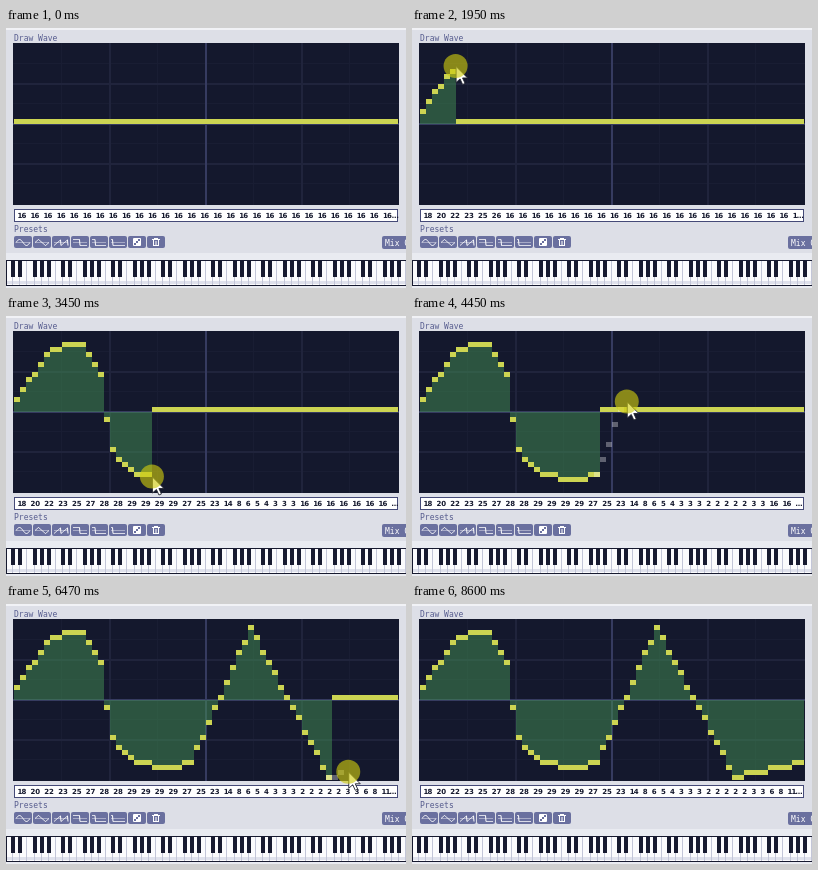
An HTML page with a canvas that plays this animation: 400x260 px, repeating every 8.99 s.

```html
<!DOCTYPE html>
<html lang="en">
<head>
<meta charset="utf-8">
<title>Wave editor</title>
<style>
html, body { margin: 0; width: 400px; height: 260px; overflow: hidden; }
canvas { display: block; }
</style>
</head>
<body>
<canvas id="stage" width="400" height="260"></canvas>
<script>
const ctx = document.getElementById("stage").getContext("2d");
const LOOP = 8990, LAG = 40;
const LEFT = 8, COL = 6, ROW = 5, MID = 96;
const INK = "#6a709f", NIGHT = "#14182d";
const DRAG_START = 1210, DRAG_END = 3920;

// Freehand curve: column, level
const curve = [[0, 18], [5, 27], [9, 29], [11, 29], [14, 23], [15, 14],
  [16, 8], [17, 6], [20, 3], [25, 1.8], [29, 2.9]];
// Freehand pace: time, column
const pace = [[DRAG_START, 0.3], [1950, 6], [2630, 15.5], [3040, 17.7], [DRAG_END, 29.2]];
// Pointer outside the freehand drag: time, x, y
const path = [[70, 309, 223], [740, 10, 93], [DRAG_START, 10, 93],
  [4170, 184, 157], [4960, 243, 23], [5333, 243, 23], [5810, 295, 140],
  [6270, 321, 172], [6300, 321, 172], [7150, 391, 160], [8080, 391, 160], [8620, 373, 265]];
// Straight lines: preview start, commit time, two ends as column and level
const lines = [
  { start: 4250, end: 5200, from: [29, 3], to: [39, 30] },
  { start: 5400, end: 6340, from: [39, 30], to: [52, 0] },
  { start: 6340, end: 7730, from: [52, 0], to: [63, 3] }
];

const clamp = (v, max) => Math.max(0, Math.min(max, v));
const easeOut = k => Math.sin(k * Math.PI / 2);
const column = x => clamp(Math.floor((x - LEFT) / COL), 63);
const level = y => clamp(Math.floor(16 + (MID - y) / ROW), 31);
const rowTop = v => MID - (v - 15) * ROW;

function interpolate(keys, at, ease = k => k) {
  const i = keys.findIndex(key => key[0] > at);
  if (i <= 0) return keys.at(i).slice(1);
  const a = keys[i - 1], b = keys[i];
  const k = ease((at - a[0]) / (b[0] - a[0]));
  return a.slice(1).map((v, n) => v + (b[n + 1] - v) * k);
}

const paceAt = t => interpolate(pace, t)[0];
const curveAt = c => interpolate(curve, c)[0];

function pointer(t) {
  if (t < DRAG_START || t > DRAG_END + 200) return interpolate(path, t, easeOut);
  const c = paceAt(t);
  return [LEFT + c * COL, rowTop(curveAt(c - 1)) + ROW / 2];
}

function linePoints([c0, v0], [c1, v1]) {
  const steps = Math.abs(c1 - c0), dir = Math.sign(c1 - c0);
  return Array.from({ length: steps + 1 }, (_, i) =>
    [c0 + i * dir, Math.ceil(v0 + (v1 - v0) * i / (steps || 1) - 0.5)]);
}

function waveAt(t) {
  const wave = Array(64).fill(16);
  if (t < DRAG_START) return wave;
  const c = paceAt(t - LAG), head = Math.floor(c);
  for (let i = 0; i <= head; i++) wave[i] = Math.round(curveAt(i));
  if (t < DRAG_END) wave[head] = Math.round(curveAt(c - 1));
  for (const { end, from, to } of lines) {
    if (t >= end) linePoints(from, to).forEach(([i, v]) => wave[i] = v);
  }
  return wave;
}

function rect(x, y, w, h, color) {
  ctx.fillStyle = color;
  ctx.fillRect(x, y, w, h);
}

function rounded(x, y, w, h, r, color) {
  ctx.fillStyle = color;
  ctx.beginPath();
  ctx.roundRect(x, y, w, h, r);
  ctx.fill();
}

function polyline(points, color) {
  ctx.strokeStyle = color;
  ctx.lineWidth = 1;
  ctx.beginPath();
  points.forEach(([x, y]) => ctx.lineTo(x, y));
  ctx.stroke();
}

function label(text, x, y, color, font = '8px "DejaVu Sans Mono", monospace') {
  ctx.font = font;
  ctx.fillStyle = color;
  ctx.fillText(text, x, y);
}

const bar = (c, v, color) => rect(LEFT + c * COL, rowTop(v), COL, ROW, color);

function drawGrid() {
  rect(7, 15, 386, 162, NIGHT);
  for (const i of [1, 3, 5, 7, 2, 6, 4]) {
    const size = i % 2 ? 1 : 2;
    const color = i === 4 ? "#363b60" : i % 2 ? "#191d33" : "#20243c";
    rect(LEFT + i * 48 - 1, 15, size, 162, color);
    rect(7, 15 + i * 20, 386, size, color);
  }
}

function drawWave(wave) {
  wave.forEach((v, c) => {
    const y = rowTop(v);
    if (v !== 16) rect(LEFT + c * COL, Math.min(y, MID), COL, Math.abs(MID - y), "rgba(66,140,84,.52)");
  });
  wave.forEach((v, c) => bar(c, v, "#ccd452"));
}

function drawPreview(t) {
  const line = lines.find(({ start, end }) => t >= start && t < end);
  if (!line) return;
  const [x, y] = pointer(t - LAG);
  linePoints(line.from, [column(x), level(y)])
    .forEach(([c, v]) => bar(c, v, "rgba(255,255,255,.32)"));
}

function drawValues(wave) {
  const font = 'bold 7px "DejaVu Sans", sans-serif';
  const advance = ch => ch === "1" ? 4 : ch === " " ? 4.3 : 4.75;
  rect(8, 181, 384, 13, "#454a78");
  rect(9, 182, 382, 11, "#fff");
  let x = 11.5;
  for (const ch of wave.join(" ")) {
    if (x + advance(ch) + 5 > 391.5) break;
    label(ch, x, 190, NIGHT, font);
    x += advance(ch);
  }
  label("…", x, 190, NIGHT, font);
}

const pulse = width => k => k < width ? 1 : -1;
const shapes = [
  k => Math.sin(k * 2 * Math.PI),
  k => Math.asin(Math.sin(k * 2 * Math.PI)) * 2 / Math.PI,
  k => (k * 2 % 1) * 2 - 1,
  pulse(0.5), pulse(0.25), pulse(0.125)
];

function drawPresets() {
  for (let i = 0; i < 8; i++) {
    const x = 8 + i * 19;
    rounded(x, 208, 18, 12, 2, INK);
    if (i < 6) {
      rect(x + 2, 214, 14, 1, "rgba(255,255,255,.4)");
      polyline(Array.from({ length: 29 }, (_, n) =>
        [x + 2 + n / 2, 214.5 - 3 * shapes[i](n / 28)]), "#fff");
    } else if (i === 6) {
      rounded(x + 5, 210, 8, 8, 1, "#fff");
      for (let n = 0; n < 3; n++) rect(x + 6 + n * 2, 215 - n * 2, 2, 2, INK);
    } else {
      rect(x + 5, 211, 8, 1, "#fff");
      rect(x + 7, 210, 4, 1, "#fff");
      ctx.strokeRect(x + 6.5, 211.5, 5, 6);
      rect(x + 8.5, 213, 1, 4, "#fff");
    }
  }
  rounded(376, 208, 40, 13, 2, INK);
  label("Mix C", 379, 217.5, "#fff");
}

function drawPiano() {
  const count = 56, key = 400 / count;
  rect(0, 232, 400, 26, "#171a30");
  rect(1, 233, 399, 24, "#fbfbfd");
  rect(1, 253, 399, 3, "#dfe1ec");
  for (let i = 1; i <= count; i++) {
    const x = Math.round(i * key);
    rect(x - 1, 233, 1, 24, "#c3c6d8");
    if (i % 7 !== 3 && i % 7 !== 0) rect(x - 2, 233, 4, 16, "#171a30");
  }
}

function drawPointer(t) {
  if (t < 70 || t >= 8600) return;
  const [x, y] = pointer(t);
  const arrow = [[0, 0], [0, 16], [4, 12.5], [6.5, 18], [9, 17], [6.5, 11.5], [11.5, 11.5]];
  ctx.beginPath();
  arrow.forEach(([px, py]) => ctx.lineTo(x + px, y + py));
  ctx.closePath();
  ctx.fillStyle = "#fff";
  ctx.strokeStyle = "#20222e";
  ctx.lineWidth = 0.9;
  ctx.fill();
  ctx.stroke();
  const released = t < 940 || t >= 7780 || (t >= 5200 && t < 5390);
  if (released) return;
  ctx.fillStyle = `rgba(206,203,14,${t < 1010 ? 0.35 : 0.63})`;
  ctx.beginPath();
  ctx.arc(x - 0.5, y - 0.5, 12, 0, 2 * Math.PI);
  ctx.fill();
}

function draw(t) {
  const wave = waveAt(t);
  rect(0, 0, 400, 260, "#dddfe7");
  rect(0, 0, 400, 2, "#f1f2f6");
  rect(0, 225, 400, 35, "#e9ebf1");
  label("Draw Wave", 8, 13, "#565c8e");
  label("Presets", 8, 204, "#565c8e");
  drawGrid();
  drawWave(wave);
  drawPreview(t);
  drawValues(wave);
  drawPresets();
  drawPiano();
  drawPointer(t);
}

const begin = performance.now();
function tick() {
  draw((performance.now() - begin) % LOOP);
  requestAnimationFrame(tick);
}
tick();
</script>
</body>
</html>
```
